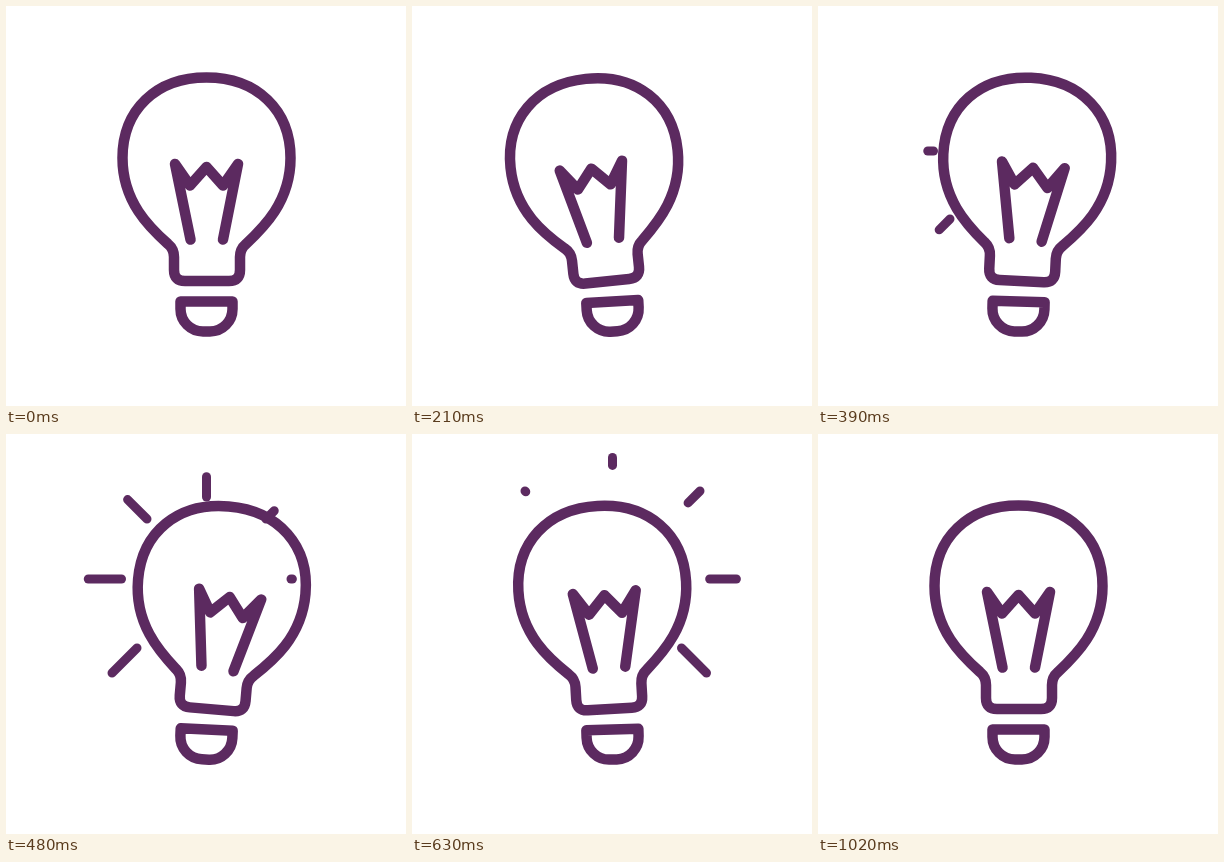
These frames come from a looping animation (400x400 px, 3050 ms). An HTML page:

```html
<!DOCTYPE html>
<html lang="en">
<head>
<meta charset="utf-8">
<title>Light bulb</title>
<style>
  html, body { margin: 0; width: 100%; height: 100%; overflow: hidden; background: #fff; }
  svg { display: block; width: 100%; height: 100%; }
  path { fill: none; stroke: #5c2a60; stroke-width: 10.5; stroke-linecap: round; stroke-linejoin: round; }
  #rays path { stroke-width: 9; }
</style>
</head>
<body>
<svg viewBox="0 0 400 400">
  <g id="rays"></g>
  <path id="glass" d="M200.5 71.5C150 71.5 116.5 104 116.5 152C116.5 196 144 222 162 238Q168 243 168 251V264Q168 275 179 275H223Q234 275 234 264V251Q234 243 240 238C257 222 284.5 196 284.5 152C284.5 104 251 71.5 200.5 71.5Z"/>
  <path id="filament" d="M184.5 233.5L169 158L184 179.5L200.5 161L217 179.5L232 158L217 233.5"/>
  <path id="base" d="M174.5 295.5H226.5V303A22.5 22.5 0 0 1 204 325.5H197A22.5 22.5 0 0 1 174.5 303Z"/>
</svg>
<script>
const LOOP = 3050, STEP = 30, MOTION_END = 1020;
const byId = id => document.getElementById(id);
const clamp = x => Math.min(1, Math.max(0, x));
const easeOut = (x, power) => 1 - (1 - clamp(x)) ** power;

// Swing angles in degrees at the shared turning times
const times = [0, 190, 470, 650, 880, 1020];
const swings = [
  { part: byId("glass"), pivotY: 330, angles: [0, -6.1, 5, -3.6, 1, 0] },
  { part: byId("filament"), pivotY: 296, angles: [0, -9.3, 10, -3.9, 0.8, 0] },
  { part: byId("base"), pivotY: 300, angles: [0, -3.2, 2.6, -1.9, 0.5, 0] }
];

function angleAt(angles, t) {
  let i = 1;
  while (i < times.length - 1 && t > times[i]) i++;
  const u = clamp((t - times[i - 1]) / (times[i] - times[i - 1]));
  return angles[i - 1] + (angles[i] - angles[i - 1]) * u * u * (3 - 2 * u);
}

// Inner and outer ends, clockwise from lower left
const rays = [
  [132, 213, 104, 241], [115.5, 145, 75.5, 145], [141, 85, 113, 57],
  [200.5, 63, 200.5, 23.5],
  [260, 85, 288, 57], [285, 145, 325, 145], [268.5, 213, 296.5, 241]
].map(ends => {
  const path = document.createElementNS("http://www.w3.org/2000/svg", "path");
  byId("rays").append(path);
  return { path, ends };
});

function drawRay({ path, ends: [x0, y0, x1, y1] }, t) {
  const head = easeOut((t - 352) / 175, 2);
  const tail = easeOut((t - 477) / 110, 1.3);
  const point = k => `${x0 + (x1 - x0) * k} ${y0 + (y1 - y0) * k}`;
  path.setAttribute("d", head > tail ? `M${point(tail)}L${point(head)}` : "");
}

function draw(t) {
  for (const { part, pivotY, angles } of swings)
    part.setAttribute("transform", `rotate(${angleAt(angles, t)} 200.5 ${pivotY})`);
  rays.forEach((ray, i) => drawRay(ray, t - i * 25));
}

const start = performance.now();
function tick() {
  const t = (performance.now() - start) % LOOP;
  draw(Math.min(MOTION_END, Math.floor(t / STEP) * STEP));
  requestAnimationFrame(tick);
}
tick();
</script>
</body>
</html>
```
